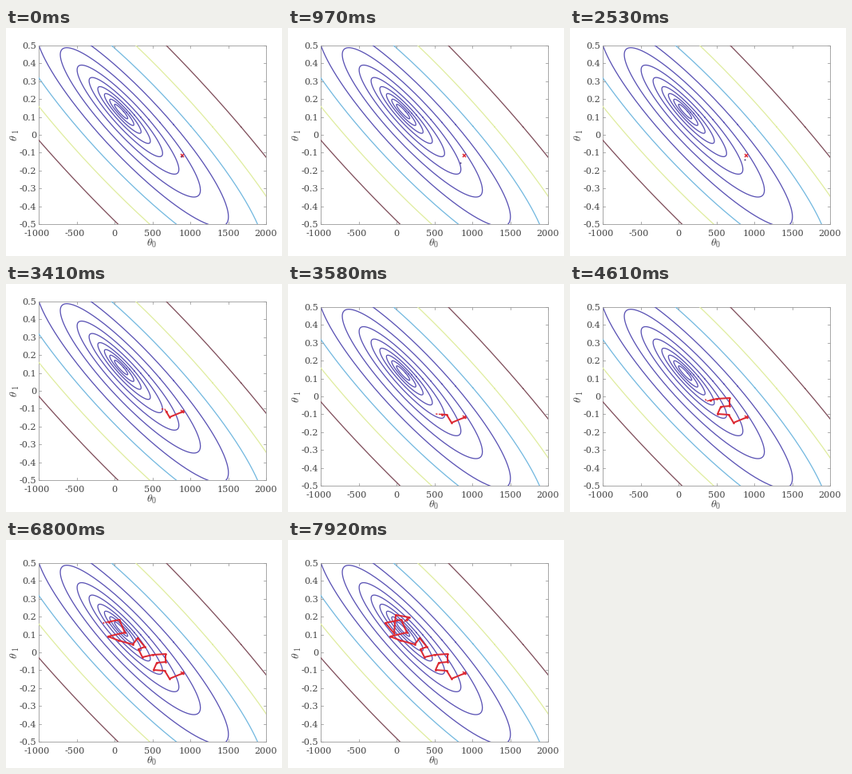
Animation, 346 px wide and 286 px high, one loop 8000 ms. Source, as a matplotlib script:

```python
import numpy as np
import matplotlib.pyplot as plt
from matplotlib.animation import FuncAnimation
from matplotlib.patches import Rectangle

W, H, DPI = 346, 286, 100
INTERVAL, LOOP = 40, 8000
PX = 72 / DPI
LEFT, RIGHT, TOP, BOTTOM = 41, 326, 22, 246
SCROLL_TIME, SCROLL = 3500, 7
HOVER_START, HOVER_END = 530, 2620
DRAW_START, DRAW_END = 2840, 7920

plt.rcParams["font.family"] = "DejaVu Serif"
plt.rcParams["mathtext.fontset"] = "cm"

fig = plt.figure(figsize=(W / DPI, H / DPI), dpi=DPI, facecolor="white")
ax = fig.add_axes([0, 0, 1, 1])
ax.axis("off")
ax.set_xlim(0, W)
ax.set_ylim(H, 0)


def label(x, y, text, size=11.3, **kw):
    ax.text(x, y, text, fontsize=size * PX, color="#444444", **kw)


def tick(xs, ys):
    ax.plot(xs, ys, color="#999999", lw=0.8 * PX)


def draw_axes():
    ax.add_patch(Rectangle((LEFT, TOP), RIGHT - LEFT, BOTTOM - TOP,
                           fill=False, ec="#a8a8a8", lw=1 * PX))
    for value in range(-1000, 2001, 500):
        x = LEFT + (value + 1000) * (RIGHT - LEFT) / 3000
        tick([x, x], [BOTTOM, BOTTOM - 3])
        tick([x, x], [TOP, TOP + 3])
        label(x - (2 if value < 0 else 0), BOTTOM + 15, f"{value}",
              ha="center", va="baseline")
    for i in range(-5, 6):
        y = TOP + (5 - i) * (BOTTOM - TOP) / 10
        tick([LEFT, LEFT + 3], [y, y])
        tick([RIGHT, RIGHT - 3], [y, y])
        label(LEFT - 3, y + 4, f"{i / 10:g}", ha="right", va="baseline")
    label(183, 270, r"$\theta_0$", 14, ha="center", va="center")
    label(11, 134, r"$\theta\,{}_1$", 14, ha="center", va="center",
          rotation=90)


def contour_color(level):
    outer = ["#804f5c", "#e0eda0", "#74b9e0"]
    return outer[level] if level < len(outer) else "#5a52b4"


def draw_contours(count=11, growth=1.36):
    """Log-spaced levels of a bowl whose centre drifts along its valley."""
    clip = Rectangle((LEFT, TOP), RIGHT - LEFT, BOTTOM - TOP,
                     transform=ax.transData)
    t = np.linspace(0, 2 * np.pi, 300)
    for level in range(count):
        half = np.sqrt((323 / growth ** level) ** 2 - 140)
        spread = 1 - np.exp(-(half / 80) ** 1.5)
        y = 104 + 20 * spread + half * np.sin(t)
        valley = 238 + .85 * (y - 215)
        x = valley + (.345 + .07 * spread) * half * np.cos(t)
        line, = ax.plot(x, y, color=contour_color(level), lw=1.3 * PX)
        line.set_clip_path(clip)


draw_contours()
draw_axes()

# corners of the descent, walked at constant speed
CORNERS = np.array([
    (222, 160), (205, 167), (199, 157), (185, 156), (189, 147), (200, 146),
    (200, 136), (184, 137), (171, 140), (166, 130), (174, 127), (165, 116),
    (159, 124), (141, 119), (128, 114), (149, 109), (142, 93), (122, 97),
    (133, 110), (135, 87), (152, 90), (143, 98),
])
STEPS = np.hypot(*np.diff(CORNERS, axis=0).T)
TIMES = DRAW_START + (DRAW_END - DRAW_START) * (
    np.append(0, np.cumsum(STEPS)) / STEPS.sum())

RED = "#dc2832"
ax.plot([220.5], [160], "x", color=RED, ms=5 * PX, mew=1.5 * PX)
stroke, = ax.plot([], [], "o-", color=RED, lw=2 * PX, ms=2.8 * PX, mew=0,
                  solid_joinstyle="round")
tail, = ax.plot([], [], color=RED, lw=1.4 * PX, ls=(0, (3, 1)))
cursor, = ax.plot([], [], "o", color="#4a3a80", ms=2 * PX, mew=0)


def walker(t):
    return [np.interp(t, TIMES, axis) for axis in CORNERS.T]


def trace(start, end):
    inner = CORNERS[(TIMES > start) & (TIMES < end)]
    return np.vstack([walker(start), inner, walker(end)]).T


def hover(t):
    u = np.clip((t - HOVER_START) / (HOVER_END - HOVER_START), 0, 1)
    return [220 - 6 * np.sin(np.pi * u)], [161 + 9 * np.sin(3 * np.pi * u)]


def update(i):
    t = i * INTERVAL
    shift = SCROLL if t >= SCROLL_TIME else 0
    ax.set_ylim(H - shift, -shift)
    settled = max(DRAW_START, t - 130)
    stroke.set_data(*trace(DRAW_START, settled))
    tail.set_data(*trace(settled, max(DRAW_START, t)))
    for line in (stroke, tail):
        line.set_visible(t > DRAW_START)
    cursor.set_data(*hover(t))
    cursor.set_visible(t <= HOVER_END)
    return stroke, tail, cursor


anim = FuncAnimation(fig, update, frames=LOOP // INTERVAL, interval=INTERVAL,
                     repeat=True, repeat_delay=0, blit=False)
plt.show()
```
